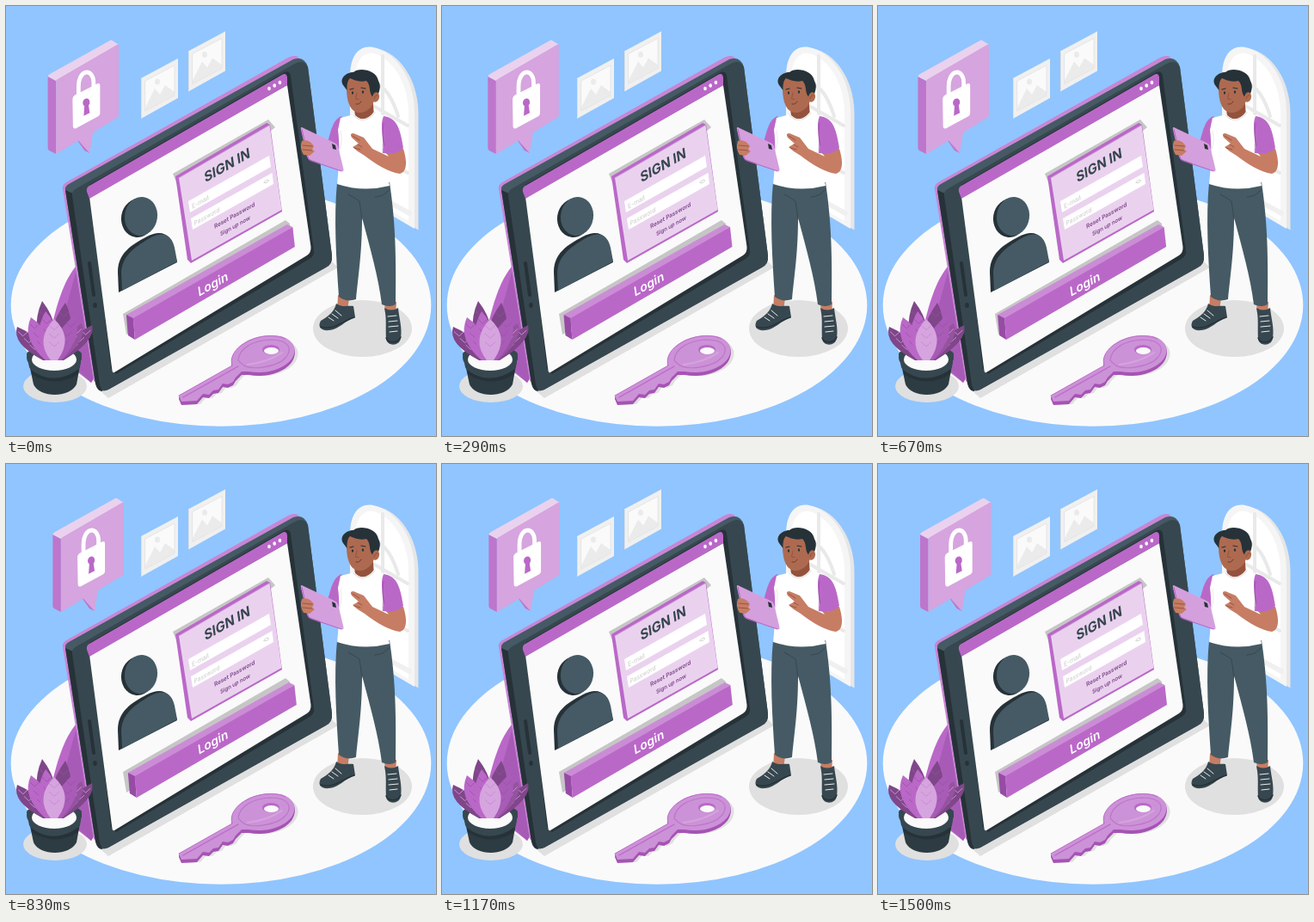
Recreate the animation shown at these times as an HTML page with a canvas. Size 500 by 500 pixels, loop 1.54 s.

```html
<!DOCTYPE html>
<html lang="en">
<head>
<meta charset="utf-8">
<title>Sign in</title>
<style>
html, body { margin: 0; width: 100%; height: 100%; overflow: hidden; background: #90c5ff; }
canvas { display: block; width: 100vw; height: 100vh; }
</style>
</head>
<body>
<canvas id="stage"></canvas>
<script>
const canvas = document.getElementById('stage');
const ctx = canvas.getContext('2d');
const ratio = window.devicePixelRatio || 1;
canvas.width = canvas.height = 500 * ratio;

const LOOP = 1540, FPS = 24;
const PURPLE = '#ba68c8', MID = '#d6a4de', PALE = '#ead2ef', DEEP = '#95539f';
const DARK = '#263238', SLATE = '#37474f', STEEL = '#455a64';
const SKIN = '#c67d64', FACE = '#ae6a50', SHADE = '#94523d', SHADOW = '#e0e0e0';

function shape(d, fill) {
  ctx.fillStyle = fill;
  ctx.fill(new Path2D(d));
}

function line(d, color, width = 1) {
  ctx.strokeStyle = color;
  ctx.lineWidth = width;
  ctx.lineCap = ctx.lineJoin = 'round';
  ctx.stroke(new Path2D(d));
}

function oval(x, y, rx, ry, fill, turn = 0) {
  ctx.fillStyle = fill;
  ctx.beginPath();
  ctx.ellipse(x, y, rx, ry, turn, 0, 7);
  ctx.fill();
}

// Text lying on the tilted screen plane.
function label(text, x, y, size, weight, color) {
  ctx.save();
  ctx.transform(.87, -.49, .14, .98, x, y);
  ctx.font = `${weight} ${size}px Inter, sans-serif`;
  ctx.fillStyle = color;
  ctx.fillText(text, 0, 0);
  ctx.restore();
}

function shifted(dx, dy, draw) {
  ctx.save();
  ctx.translate(dx, dy);
  draw();
  ctx.restore();
}

function picture() {
  shape('M0 23 L43 0 V46 L0 70Z', '#f0f0f0');
  line('M.5 24 V69', '#e0e0e0');
  shape('M5 26 L39 8 V43 L5 61Z', '#fafafa');
  shape('M5 57 L16 35 L22 42 L28 31 L39 39 V43 L5 61Z', '#ebebeb');
  oval(19, 27, 3, 3.5, '#ebebeb');
  line('M5 26 L39 8 V43 L5 61Z', '#e3e3e3', .8);
}

function archWindow() {
  const arch = 'M400 215 V82 C400 57 411 45 427 48 C452 53 474 82 475 122 V259Z';
  shifted(4.5, 1.5, () => shape(arch, '#e6e6e6'));
  shape(arch, '#f5f5f5');
  shape('M406 215 V86 C406 65 414 53 427 55 C448 60 467 87 468 122 V250Z', '#fff');
  line('M438 58 V234 M406 104 L467 139 M406 159 L467 194 M420 92 Q442 84 456 128', '#e9e9e9', 4);
  line('M406 206 L469 241', '#f0f0f0', 6);
}

function padlock() {
  line('M86 109 V95 C86 73 103.500 73 103.500 90 V98', '#fff', 4.8);
  shape('M79 109 Q79 106 81.500 104.500 L108 91 Q111 90 111 93 V125 Q111 128 108 129.500 L83 143 Q79.500 144 79.500 140Z', '#fff');
  oval(95, 113, 4, 4.8, PURPLE, .25);
  shape('M93 115 H97.500 L99 125 L92 128.500Z', PURPLE);
}

function bubble() {
  shape('M48.5 82 L58 87 V172 L50 168 Q48.5 167 48.5 165Z', '#bd76cc');
  shape('M82 155 L91 150 L97 171 L91 168Z', '#bd76cc');
  shape('M48.5 82 Q49 80 51 79 L121 40 Q123 39.500 124 40.500 L131 45 L58 87Z', PALE);
  shape('M58 88 Q58 86 60 85 L129 45 Q131 44 131 46 V127 Q131 129 129 130 L101 147 L97 171 L84 156.500 L60 171 Q58 172 58 170Z', MID);
  shifted(-1.8, -.8, padlock);
}

function tablet() {
  shape('M110 448 L119 456 L386 304 L378 296Z', SHADOW);
  shape('M83 301 C67 318 57 350 48 398 L99 438 L104 430Z', PURPLE);
  shape('M83 303 L70 350 L66 407 L99 438 L104 430Z', '#a75bb6');
  shape('M66 213 Q65 208 70 205 L328 60 Q338 55 342 62 L110 440 L102 436Z', '#c985d5');
  shape('M69 214 Q68 210 73 207 L334 62 Q347 58 351 71 L379 290 Q380 300 372 304 L119 446 Q108 451 104 439Z', STEEL);
  shape('M69 214 L78 218 L112 448 Q106 448 104 439Z', DARK);
  shape('M77 221 Q76 215 82 212 L334 68 Q346 61 351 71 L379 290 Q380 300 372 304 L119 446 Q111 450 109 440Z', SLATE);
  shape('M97 208 L324 77 Q330 75 331 81 L358 284 Q359 290 353 294 L128 428 L122 422Z', DARK);
  shape('M97 222 L327 92 L354.500 280 Q355 287 350 290 L126 426 Q124 427 123.500 424Z', '#fafafa');
  shape('M94 216 Q93 211 97 209 L321 80 Q326 77 327 83 V92 L97 224Z', PURPLE);
  for (let i = 0; i < 3; i++) oval(306 + i * 6.2, 96 - i * 3.5, 1.8, 2.2, '#fff');
  line('M97 299 L102 336', DARK, 4);
  oval(103.5, 348, 2.3, 3, DARK);
}

function avatar() {
  oval(153.5, 246.5, 19.500, 22.500, DARK, .15);
  oval(157, 244.5, 19, 22.500, STEEL, .15);
  shape('M131 333 L130 309 C130 288 145 278 164 268 C184 258 192 269 195 281 L199 298Z', DARK);
  shape('M135 331 L134 311 C134 292 148 281 167 270 C185 260 193 268 196 281 L199 297Z', STEEL);
}

function card() {
  shape('M194 195 L305 132 L313 141 L208 230Z', '#c6c6c6');
  shape('M197 198 L303 136 L307 138 L321 239 L215 299 L211 295Z', PURPLE);
  shape('M201 200 L306.500 138.500 L320.500 237 L216 296Z', PALE);
  line('M201 200 L306 139', '#d7a9e0', 1);
  label('SIGN IN', 231.5, 205.5, 16.3, 700, SLATE);
  shape('M212 227 L306 174 L308 187 L214 240Z', '#fff');
  shape('M215 247 L309.500 194 L311 207 L217 260Z', '#fff');
  label('E-mail', 216.5, 236, 7.6, 400, '#c9c9c9');
  label('Password', 219, 255.5, 7.4, 400, '#c9c9c9');
  line('M300 205.500 Q302 201 305.500 202.500 Q304.500 207 300 205.500', '#d0d0d0', .9);
  label('Reset Password', 242.5, 259, 7, 600, '#7d4589');
  label('Sign up now', 249.5, 267.5, 6.7, 600, '#7d4589');
}

function button(dx) {
  shape('M136 358 L325 249 L330 253 L332 275 L140 382Z', '#c6c6c6');
  shifted(dx, 0, () => {
    shape('M140 359 L327 254 L333.500 257 L148 364Z', '#cb8cd6');
    shape('M140 359 L148 363 L150 388 L142 383Z', '#974ba5');
    shape('M148 363 L333.500 257 L336 280 L150 388Z', PURPLE);
  });
  label('Login', 224, 338, 14.9, 600, '#fff');
}

function key() {
  const outline = 'M201 453 L263 418 C261 413 262 407 267 401 C276 387 300 380 320 384'
    + ' C335 389 339 399 333 409 C325 422 302 429 282 425 L274 425 L267 432 L264 437'
    + ' L258 440 L252 439 L247 446 L241 447 L236 452 L229 451 L222 459 L204 460Z';
  const body = '#cc92d7';
  shifted(4, 4, () => shape(outline, SHADOW));
  for (let i = 4; i > 0; i--) shifted(0, i, () => shape(outline, '#a653b5'));
  shape(outline, body);
  line('M201 453 L263 418 C260 409 266 400 273 395 C290 382 313 381 325 387', PURPLE, .9);
  line('M270 412 C271 398 287 389 307 388 C329 388 333 398 326 408 C316 420 284 425 274 416Z', '#bd76ca', 1.2);
  line('M206 455 L270 419', PURPLE, 1.2);
  line('M281 417 Q305 414 321 403', MID, 2);
  oval(308, 399.5, 10, 5.5, PURPLE);
  oval(308.5, 401, 8.5, 4, '#fafafa');
}

function leaf(tipX, tipY, baseX, width, color, ribs) {
  const baseY = 412, midX = tipX * .55 + baseX * .45, midY = tipY * .5 + baseY * .5;
  shape(`M${tipX} ${tipY} Q${midX + width} ${midY - 3} ${baseX + 4} ${baseY}`
    + ` L${baseX - 4} ${baseY} Q${midX - width} ${midY} ${tipX} ${tipY}Z`, color);
  for (let i = 1; i < 4; i++) {
    const k = i * .2, x = tipX + (baseX - tipX) * k, y = tipY + (baseY - tipY) * k;
    line(`M${x - width * .25} ${y - 2} L${x} ${y + 3} L${x + width * .25} ${y - 2}`, ribs, .8);
  }
}

function plant() {
  oval(57, 442, 37, 19, SHADOW);
  shape('M25 407 L32 440 C39 456 74 456 82 440 L88 407Z', '#2d3b42');
  shape('M24 405 C24 394 88 394 88 405 L86 420 C79 437 34 437 27 420Z', SLATE);
  shape('M29 423 Q55 443 85 422 L84 428 Q57 445 30 428Z', DARK);
  oval(56, 409, 32, 17, SLATE);
  oval(56, 411, 26, 13, '#fafafa');
  leaf(42, 343, 52, 20, '#7f4689', DEEP);
  leaf(69, 345, 59, 20, '#7f4689', DEEP);
  leaf(100, 371, 63, 22, '#7f4689', MID);
  leaf(13, 373, 47, 22, '#7f4689', MID);
  leaf(88, 369, 61, 20, DEEP, MID);
  leaf(29, 362, 50, 21, PURPLE, DEEP);
  leaf(79, 360, 60, 21, '#a95bb8', DEEP);
  leaf(46, 355, 53, 20, PURPLE, DEEP);
  leaf(56, 364, 56, 23, MID, '#c68ad1');
}

function shoes() {
  shape('M386 336 L399 340 L397 354 L385 354Z', SKIN);
  shape('M440 344 L454 344 L453 360 L441 358Z', SKIN);
  shape('M384 346 C391 351 398 348 404 349 L406 362 C393 366 388 376 376 377 C366 378 362 373 366 366 C375 361 382 355 384 346Z', SLATE);
  line('M366 373 C381 378 389 367 405 362', DARK, 1.5);
  line('M379 358 L386 363 M383 354 L390 360 M375 362 L381 366', '#fff', .9);
  shape('M440 351 Q448 356 456 351 C457 363 461 374 459 386 C458 396 443 396 442 387 C441 375 443 365 440 351Z', SLATE);
  line('M442 386 C445 393 456 392 459 385', DARK, 1.5);
  line('M444 361 L454 360 M445 367 L455 366 M445 373 L456 372 M446 379 L455 378', '#fff', .9);
}

function trousers() {
  shape('M385 205 H446 C452 247 454 279 453 347 Q446 351 437 347 C433 315 424 284 414 246 C414 286 410 310 407 341 Q396 345 387 338 C384 293 381 246 385 205Z', STEEL);
  line('M398 219 Q407 224 411 227 L414 248 M445 214 Q439 222 429 222', SLATE, 1);
}

function head() {
  shape('M404 111 L426 103 L428 128 Q416 139 406 128Z', SHADE);
  shape('M396 88 C398 80 427 79 430 95 C431 109 425 122 413 124 C400 125 395 111 396 88Z', FACE);
  shape('M392 92 C387 84 396 77 404 77 C410 71 431 74 433 87 C437 93 434 102 429 110 L425 104 C422 99 424 91 419 87 C411 89 405 86 400 84 Q396 87 396.500 98Z', DARK);
  oval(430, 106, 4, 5.8, FACE, .2);
  line('M428 108 Q430 102 432 104', SHADE, 1);
  oval(403, 101, 1.1, 1.7, DARK);
  oval(415, 100, 1.1, 1.7, DARK);
  line('M400 97 L404 96 M413 95 L418 96', DARK, 1.2);
  line('M408 101 L406.500 108 L410 108.500', SHADE, .9);
  line('M407 114 Q411 115 413 111', '#6f3927', 1);
}

function torso() {
  shape('M390 128 C380 132 378 145 374 158 L389 167 L397 139Z', PURPLE);
  shape('M389 130 L405 126 Q416 138 428 123 L441 128 C446 149 440 176 446 209 Q415 217 385 207 C388 182 388 159 386 144Z', '#fff');
  line('M404 127 Q416 139 429 124', '#e4e4e4', 1.2);
  line('M389 145 Q392 156 388 167 M438 160 L437 173', '#e6e6e6', .8);
}

function arms() {
  shape('M438 166 L462 166 C467 182 466 193 458 195 C447 194 431 185 417 174 L409 169 L403 164 L410 160 L402 153 Q399 148 404 148 L416 153 L426 166 L445 175Z', SKIN);
  line('M405 165 L412 167 M409 161 L414 164 M403 151 L411 156', SHADE, .9);
  shape('M439 128 C453 130 458 139 462 165 Q454 174 438 171 C440 156 434 139 439 128Z', PURPLE);
  line('M439 136 Q437 150 440 162', DEEP, .8);
  shape('M346 142 Q342 139 343 144 L350 175 Q351 178 354 179 L390 192 Q393 193 392.500 190 L386 163 Q385 160 382 159Z', '#d49fdd');
  line('M344 143 L351 176 Q352 179 355 180 L390 192', PURPLE, 1.2);
  shape('M379 160 L383 162 L384 167 L380 166Z', DARK);
  shape('M344 157 C349 155 355 158 358 163 L356 167 L359 169 L353 174 L346 173 Q341 165 344 157Z', SKIN);
  line('M345 162 L356 163 M345 167 L356 168', SHADE, .9);
}

function man() {
  oval(414.5, 375, 57.5, 33, SHADOW);
  shoes();
  trousers();
  head();
  torso();
  arms();
}

// Shake offset at each tenth of the cycle, linear in between.
const SHAKE = [0, -1, 2, -4, 4, -4, 4, -4, 2, -1, 0, 0];
function shake(ms) {
  const step = Math.min(1, .012 + ms / 1485) * 10;
  const i = Math.floor(step);
  return SHAKE[i] + (SHAKE[i + 1] - SHAKE[i]) * (step - i);
}

function draw(ms) {
  const tick = Math.floor((ms + 4.9) * FPS / 1000);
  const offset = shake(tick * 1000 / FPS);
  ctx.setTransform(ratio, 0, 0, ratio, 0, 0);
  ctx.fillStyle = '#90c5ff';
  ctx.fillRect(0, 0, 500, 500);
  oval(250, 347.8, 244.3, 141, '#fafafa');
  shifted(157, 61, picture);
  shifted(212, 29.5, picture);
  archWindow();
  shifted(.5 + offset * 2.9, 0, bubble);
  tablet();
  avatar();
  card();
  button(offset);
  key();
  plant();
  man();
}

function frame() {
  draw(performance.now() % LOOP);
  requestAnimationFrame(frame);
}
frame();
</script>
</body>
</html>
```
